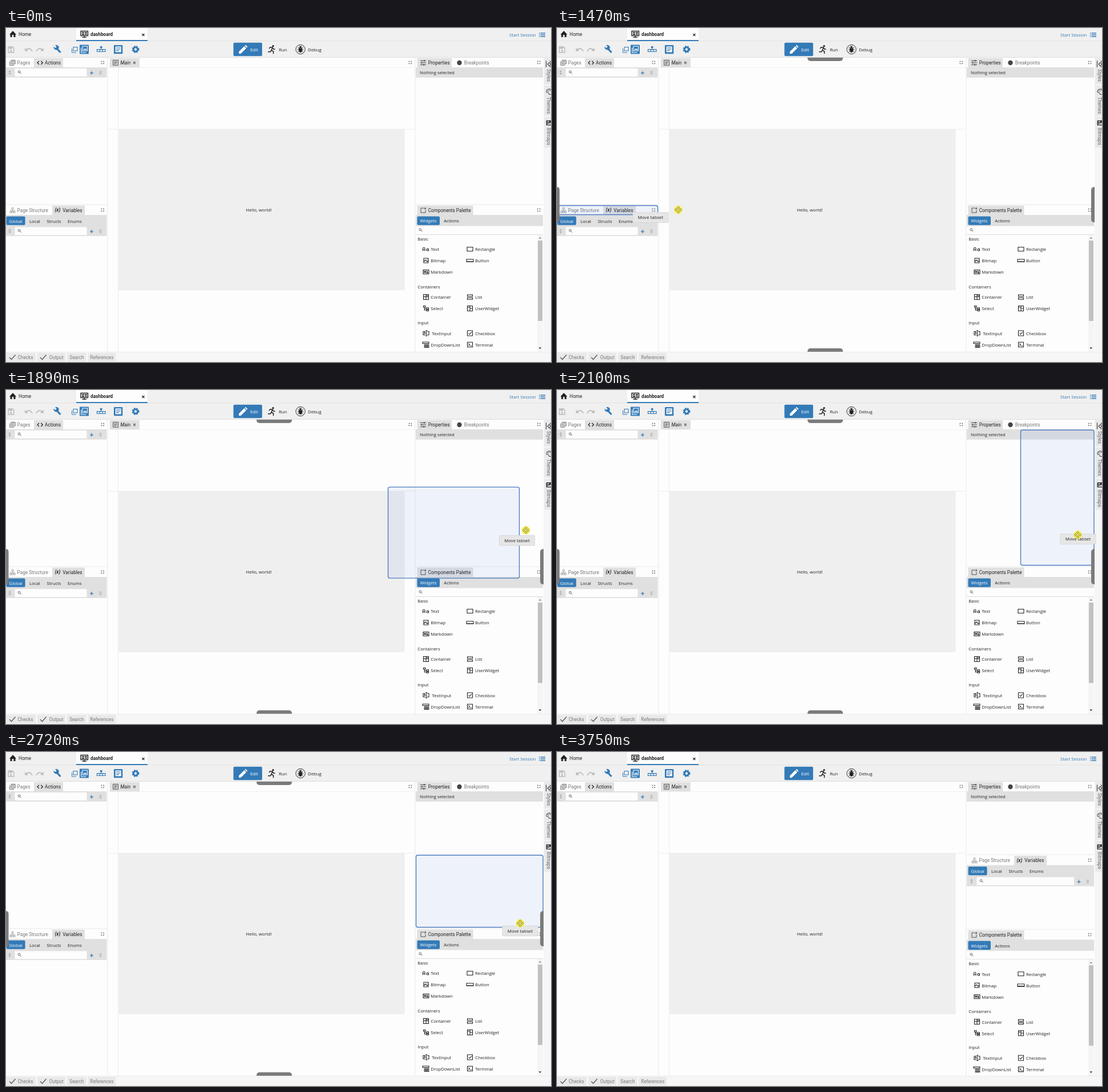
Recreate the animation shown at these times as an HTML page with a canvas. Size 955 by 586 pixels, loop 4.41 s.

```html
<!DOCTYPE html>
<html lang="en">
<head>
<meta charset="utf-8">
<title>Docking a tabset</title>
<style>
html, body { margin: 0; width: 100%; height: 100%; overflow: hidden; background: #fdfdfd; }
canvas { display: block; }
</style>
</head>
<body>
<canvas id="stage" width="955" height="586"></canvas>
<script>
const ctx = document.getElementById('stage').getContext('2d');
const LOOP = 4410, DRAG = 1340, DROP = 3130;
const BLUE = '#337ab7', INK = '#222', DIM = '#7a7a7a', BAR = '#e0e0e0', PALE = '#f0f0f0', WHITE = '#fdfdfd';
const UI = '7.75px "Open Sans", sans-serif';
const TAB = '8.25px Roboto, sans-serif';

// ---- drawing helpers ----
function box(x, y, w, h, color, r = 0) {
  ctx.fillStyle = color;
  ctx.beginPath();
  ctx.roundRect(x, y, w, h, r);
  ctx.fill();
}
function fill(d, color = INK) {
  ctx.fillStyle = color;
  ctx.fill(new Path2D(d));
}
function line(d, color = INK, width = 1) {
  ctx.strokeStyle = color;
  ctx.lineWidth = width;
  ctx.stroke(new Path2D(d));
}
function dot(x, y, r, color) {
  ctx.fillStyle = color;
  ctx.beginPath();
  ctx.arc(x, y, r, 0, 7);
  ctx.fill();
}
// y is the middle of the capitals
function text(s, x, y, color = INK, font = UI, align = 'left') {
  ctx.font = font;
  ctx.fillStyle = color;
  ctx.textAlign = align;
  ctx.fillText(s, x, y + 2.9);
}
const tab = (s, x, y, on) => text(s, x, y, on ? INK : DIM, TAB);
function at(x, y, draw) {
  ctx.save();
  ctx.translate(x, y);
  draw();
  ctx.restore();
}
const maximise = (x, y) => at(x, y, () =>
  line('M-2.2-.8V-2.2H-.8M.8-2.2H2.2V-.8M2.2.8V2.2H.8M-.8 2.2H-2.2V.8', '#444', .9));
const lens = (x, y) => at(x, y, () =>
  line('M1.2-.6A1.9 1.9 0 1 1-2.6-.6A1.9 1.9 0 1 1 1.2-.6M.6.8L2.8 3', '#444', .8));
const cross = (x, y, s, color) => at(x, y, () =>
  line(`M${-s} ${-s}L${s} ${s}M${s} ${-s}L${-s} ${s}`, color, 1.1));

// ---- top bars ----
function topBars() {
  box(0, 0, 955, 52, PALE);
  box(0, 22.5, 955, .8, '#ddd');
  box(0, 51, 955, 1, '#dcdcdc');
  fill('M6 11.5L12 5L18 11.5H16.5V16H13.4V12H10.6V16H7.5V11.5Z');
  text('Home', 22, 11.3, INK, TAB);

  box(123, 0, 125, 23, WHITE);
  box(123, 21, 125, 2, BLUE);
  line('M131 5.5H143.5V13.5H131ZM137.2 13.5V16M133.5 16.4H141', INK, 1.4);
  fill('M133 7.3H137V9H133ZM133 10H137V12H133ZM138.2 7.3H141.8V9.6H138.2ZM138.2 10.6H141.8V12H138.2Z');
  text('dashboard', 148, 11.3, INK, 'bold ' + TAB);
  cross(240.5, 12, 2, INK);
  text('Start Session', 882, 12.4, BLUE);
  line('M936.5 9H945M936.5 12H945M936.5 15H945M934 9H935.4M934 12H935.4M934 15H935.4', BLUE, 1.3);

  const off = '#b9b9b9';
  line('M4 33H11.5L13.8 35.3V43H4Z', off, 1.4);
  fill('M5.5 34H11V36.5H5.5Z', off);
  dot(8.9, 40, 1.7, off);
  for (const [x, k] of [[40, 1], [59, -1]]) at(x, 38, () => {
    ctx.scale(k, 1);
    line('M-4.5.2Q2-5 6 3', off, 1.6);
    fill('M-6.8-3.2V2.4H-1.2Z', off);
  });
  line('M88.5 35.5L95.5 43', BLUE, 3.2);
  fill('M83.5 32.5L86.3 35.2L88.8 32.8L86 30.2Q89.5 29 91.8 31.4Q94 34.5 91.3 37.2Q88 39.5 85 37.3Q82.7 35.3 83.5 32.5Z', BLUE);
  line('M118 33.5H125V40H118Z', BLUE, 1.1);
  line('M115.5 36V43H123', BLUE, 1);
  box(129, 29.5, 16, 16, BLUE, 1);
  line('M134 32H142.5V40H134Z', '#fff', 1.1);
  line('M131.7 34.5V43H140.5', '#fff', 1.1);
  fill('M135.3 38.5L137.2 36L138.6 37.4L139.8 35.8L141.6 38.5Z', '#fff');
  line('M166.7 34V38.5', BLUE, 1.1);
  line('M159.5 37.7H174V41.5H159.5ZM164.3 37.7V41.5M169.2 37.7V41.5', BLUE, 1.2);
  fill('M164.9 32H168.5V35.2H164.9Z', BLUE);
  box(189, 30, 15.3, 15.3, BLUE, 1);
  box(191.7, 32.4, 10, 10, '#fff');
  line('M193 34.8H200.4M193 37.2H200.4M193 39.6H198', BLUE, 1.1);
  line('M230.7 37.5A3.7 3.7 0 1 1 223.3 37.5A3.7 3.7 0 1 1 230.7 37.5', BLUE, 3);
  ctx.setLineDash([2.4, 2.15]);
  line('M232.6 37.5A5.6 5.6 0 1 1 221.4 37.5A5.6 5.6 0 1 1 232.6 37.5', BLUE, 1.8);
  ctx.setLineDash([]);

  box(398.5, 25.7, 50.3, 23.6, BLUE, 2);
  fill('M408 45V41.6L417.5 32L421 35.4L411.4 45ZM418.4 31.2L419.9 29.8L423.3 33.2L421.9 34.6Z', '#fff');
  text('Edit', 428, 38, '#fff');
  dot(468, 31.6, 1.7, INK);
  line('M461 36L463 33.8L467 34.2L465 39L468.5 41V45.3M465 39L463.5 41.7H459M467 34.5L469 37.2H471.5', INK, 1.5);
  text('Run', 478, 38);
  line('M524.2 37.5A8.2 8.2 0 1 1 507.8 37.5A8.2 8.2 0 1 1 524.2 37.5', INK, .9);
  line('M511.5 33.5L513.5 36H518.5L520.5 33.5M510.7 38H521.3M511.5 42.5L513.5 40H518.5L520.5 42.5M514.5 31L515.4 33M517.5 31L516.6 33', INK, .9);
  fill('M516 32.3Q518.2 32.5 518.2 35H513.8Q513.8 32.5 516 32.3ZM513 35.5H519V39Q518.5 43 516 43Q513.5 43 513 39Z');
  text('Debug', 529, 38);
}

// ---- panels ----
function searchRow(left, right, y) {
  at(left + 6.5, y, () => fill('M-2.2-.8L0-4L2.2-.8ZM-2.2.8L0 4L2.2.8Z', '#aaa'));
  box(left + 15.5, y - 7, right - left - 50.5, 14, WHITE);
  lens(left + 23.8, y - .5);
  at(right - 26.5, y + .8, () => line('M-3 0H3M0-3V3', BLUE, 1.3));
  at(right - 11, y + .5, () => {
    line('M-2.5-2.3H2.5M-.8-3.2H.8', '#bbb', 1);
    fill('M-2-1.3H2L1.7 3.3H-1.7Z', '#c3c3c3');
  });
}

function variables(left, right, y) {
  at(left + 11.5, y + 8.7, () =>
    line('M-1.5-4.5H1.5V-1.8H-1.5ZM0-1.8V.5M-3.5 2V.5H3.5V2M-4.7 2H-2.2V4.5H-4.7ZM-1.2 2H1.2V4.5H-1.2ZM2.2 2H4.7V4.5H2.2Z', '#999', .8));
  tab('Page Structure', left + 19.5, y + 8.7);
  box(left + 81, y + .5, 57, 17, BAR);
  text('(x)', left + 85.5, y + 8.2, INK, 'italic bold ' + TAB);
  tab('Variables', left + 99.3, y + 8.7, true);
  maximise(right - 7.3, y + 8.3);
  box(left - 2, y + 17, right - left + 2, 37, BAR);
  box(left + .6, y + 19.4, 33, 15.4, BLUE, 2);
  text('Global', left + 5.5, y + 27.7, '#fff');
  text('Local', left + 41, y + 27.7);
  text('Structs', left + 71.5, y + 27.7);
  text('Enums', left + 108, y + 27.7);
  searchRow(left, right, y + 45.3);
}

function leftTop() {
  line('M9 56.5H16V63H9ZM6.7 58.5V65.3H14M10.5 58.5H14.5M10.5 60.7H14.5', '#555', .9);
  tab('Pages', 19.5, 61);
  box(49, 53, 51, 16, BAR);
  line('M58 58L55 61L58 64M61.3 58L64.3 61L61.3 64', INK, 1.2);
  tab('Actions', 68, 61, true);
  maximise(169.3, 60.5);
  box(0, 69, 176.5, 18, BAR);
  searchRow(0, 176.5, 78);
}

function editor() {
  box(182, 53, 52, 16, BAR);
  line('M187.7 56.5H196.5V65.3H187.7ZM189.5 59H194.7M189.5 61H194.7M189.5 63H193', '#444', .9);
  text('Main', 200.5, 61, INK, 'italic ' + TAB);
  cross(225, 61, 2, '#666');
  maximise(708.3, 60.5);
  box(179, 69, 537, .8, '#eee');
  box(196, 69, 1, 499, '#eee');
  box(179, 177, 537, 1, '#eee');
  box(196.5, 178, 502, 282, '#efefef');
  text('Hello, world!', 442.8, 319, INK, UI, 'center');
}

function properties() {
  box(720.5, 53, 60.5, 16, BAR);
  line('M726 57.5H736M726 61H736M726 64.5H736M733 56V59M728.5 59.5V62.5M732 63V66', '#333', .9);
  tab('Properties', 739.7, 61, true);
  dot(794.5, 61, 4.2, '#444');
  tab('Breakpoints', 802.8, 61);
  maximise(933.7, 60.5);
  box(718, 69, 223, 18, BAR);
  text('Nothing selected', 725, 78.3);
}

const widgets = [
  ['Text', 744.3, 388, 'M-5.5 3.2V-1Q-5.5-3-3.7-3Q-2-3-2-1V3.2M-5.5 1H-2M4.5-.8V3.2M4.5 1.2A1.8 1.8 0 1 1 .9 1.2A1.8 1.8 0 1 1 4.5 1.2'],
  ['Rectangle', 822, 388, 'M-5-3.5H5V3.5H-5Z'],
  ['Bitmap', 744.3, 408, 'M-4-4H4V4H-4ZM-4 2L-1-1L2 2L4 0M1.2-2H2.2'],
  ['Button', 822, 408, 'M-6-2.2H6V2.2H-6ZM-6 1.7H6'],
  ['Markdown', 744.3, 428, 'M-5-3.5H5V3.5H-5ZM-3 2V-1.5L-1.5.5L0-1.5V2M2.5-2V1.5M1.3.5L2.5 2L3.7.5'],
  ['Container', 744.3, 472, 'M-4.5-4.5H4.5V4.5H-4.5ZM0-4.5V4.5M-4.5-.5H4.5M0-2.5H4.5'],
  ['List', 822, 472, 'M-4.5-4H4.5V-1H-4.5ZM-4.5 1.2H4.5V4.2H-4.5Z'],
  ['Select', 744.3, 492, 'M-4.5-4.5H-1V-2H-4.5ZM-2.7-2V3H1M-2.7.2H1M1-1.2H4.5V1.2H1ZM1 2.2H4.5V4.5H1Z'],
  ['UserWidget', 822, 492, 'M-4.5-4.5H4.5V4.5H-4.5ZM0-4.5V4.5M0 0H4.5M-4.5-2H0'],
  ['TextInput', 746.3, 535.5, 'M-1-3H-5V3H-1M2.5-3H5V3H2.5M.8-4.5V4.5M-.7-4.7H2.3M-.7 4.7H2.3M-3.5 1L-2.2-1.5L-1 1'],
  ['Checkbox', 822, 535.5, 'M-4.5-4.5H4.5V4.5H-4.5ZM-2.5 0L-.7 2L3-2.2'],
  ['DropDownList', 744.3, 555.5, 'M-6-4.5H5V-2H-6ZM-3.5-.2H5.5M-3.5 1.6H5.5M-3.5 3.4H5.5M-3.5 5H5.5'],
  ['Terminal', 822, 555.5, 'M-4.5-4.2H4.5V4.2H-4.5ZM-2.5-2L-.5 0L-2.5 2M.5 2H3']
];

function palette() {
  box(720.5, 311.5, 98, 17, BAR);
  line('M732 316H727V324H735V319.5M734.5 314.5V318.5M732.5 316.5H736.5', '#444', .9);
  tab('Components Palette', 739.7, 319.7, true);
  maximise(933.7, 319.3);
  box(718, 328, 223, 19.5, BAR);
  box(720.5, 330.4, 39.5, 15.4, BLUE, 2);
  text('Widgets', 725.5, 338.5, '#fff');
  text('Actions', 767.3, 338.5);
  lens(726.5, 354.3);
  box(718, 362, 223, .9, '#ddd');
  text('Basic', 721.3, 370.3);
  text('Containers', 721.3, 453.7);
  text('Input', 721.3, 517);
  for (const [name, x, y, d] of widgets) {
    text(name, x, y + .4);
    at(x < 800 ? 736 : 813, y, () => line(d, INK, 1.1));
  }
  box(931, 363, 10, 205, '#f5f5f5');
  box(932, 373, 8, 141, '#c1c1c1');
  fill('M933.4 369.5L935.8 366.8L938.2 369.5Z', '#888');
}

function sidebars() {
  box(942, 52, 13, 516, '#f6f6f6');
  for (const [name, y, h, start] of [['Styles', 53, 46, 72], ['Themes', 101, 53, 121], ['Bitmaps', 156, 54, 175]]) {
    box(943, y, 12, h, '#e9e9e9');
    at(951, start, () => {
      ctx.rotate(Math.PI / 2);
      text(name, 0, 0, '#666', TAB);
    });
  }
  line('M946.5 57.5V69M949 63.5L952 60.5L955 63.5L952 66.5ZM953 58L955 60M952 68H955', '#444', 1.2);
  line('M955 108Q950 105.5 947 110.5Q946.5 113.5 950 113.5Q952 114 951.5 116.5H955', '#555', 1.1);
  dot(950, 110.5, .9, '#555');
  dot(953, 109.6, .9, '#555');
  box(946.5, 162, 9, 9, '#444', 1);
  fill('M948 169.5L950 167L951.5 168.3L953.5 166L955 168V169.5ZM949 163.5H951V165.5H949Z', '#eee');

  box(0, 568, 955, 18, '#f6f6f6');
  box(0, 568, 955, .8, '#e8e8e8');
  for (const [name, x, w, tx] of [['Checks', 1, 51, 20.5], ['Output', 55, 49, 75.8], ['Search', 107, 33.5, 111.3], ['References', 143.5, 49, 147.3]]) {
    box(x, 570, w, 15, '#e9e9e9');
    tab(name, tx, 577.7);
    if (tx - x > 10) at(x, 577.5, () => line('M5 .5L8.5 4L15.5-4', '#555', 1.3));
  }
}

function layout(docked) {
  box(0, 0, 955, 586, WHITE);
  topBars();
  box(177, 52, 1.5, 516, PALE);
  box(716, 52, 1.5, 516, PALE);
  leftTop();
  editor();
  properties();
  if (docked) {
    box(718, 179.5, 223, 1.5, PALE);
    variables(720, 941, 181.5);
  } else {
    box(0, 309, 177, 1.5, PALE);
    variables(0, 176.5, 311);
  }
  at(0, docked ? 1.2 : 0, () => {
    box(718, 309, 223, 1.5, PALE);
    palette();
  });
  fill('M933.4 560.5L935.8 563.2L938.2 560.5Z', '#333');
  sidebars();
}

// ---- motion ----
// Screen updates: [first, last, count], about 70 ms apart
const updates = [0];
for (const [a, b, n] of [[460, 940, 8], [1010, 1140, 3], [1340, 1820, 8], [1890, 2380, 8], [2450, 2720, 5], [3130, 3130, 1], [3400, 3750, 6]])
  for (let i = 0; i < n; i++) updates.push(Math.floor((a + (b - a) * i / (n - 1 || 1)) / 10) * 10);

const route = [
  [460, 822, 550], [530, 710, 505], [600, 530, 432], [670, 350, 375], [740, 222, 346], [800, 155, 336], [870, 130, 334],
  [940, 132, 330], [1010, 138, 327], [1140, 149, 321], [1340, 151, 320], [1400, 164, 319], [1470, 212.5, 319],
  [1540, 345, 309], [1610, 560, 286], [1680, 745, 266], [1750, 850, 256], [1820, 895.5, 250.5], [1890, 911, 246],
  [2030, 913, 248], [2170, 912, 260], [2310, 910, 273], [2380, 907.5, 278.5], [2520, 904, 292], [2650, 901, 300.5],
  [3330, 901, 300.5], [3400, 903, 316], [3470, 908, 362], [3540, 917, 430], [3610, 926, 500], [3680, 933, 562], [3750, 935, 600]
];
const mix = (a, b, k) => a + (b - a) * k;
function pointer(t) {
  const i = Math.max(1, route.findIndex(p => p[0] >= t));
  const [t0, x0, y0] = route[i - 1], [t1, x1, y1] = route[i];
  const k = (t - t0) / (t1 - t0);
  return [mix(x0, x1, k), mix(y0, y1, k)];
}

// The CSS "ease" curve
function ease(x) {
  if (x >= 1) return 1;
  const curve = (u, a, b) => 3 * (1 - u) * u * ((1 - u) * a + u * b) + u ** 3;
  let lo = 0, hi = 1;
  for (let i = 0; i < 16; i++) {
    const mid = (lo + hi) / 2;
    if (curve(mid, .25, .25) < x) lo = mid; else hi = mid;
  }
  return curve(lo, .1, 1);
}

// Drop zones as left, top, right, bottom
const header = [0, 311.5, 176.5, 327.5];
const zones = [
  [1470, [179, 53, 448, 568]],
  [1650, [179, 53, 717, 568]],
  [1698, [718.5, 181, 941, 307.5]],
  [1930, [830.5, 53, 941, 307.5]],
  [2390, [718.5, 181, 941, 307.5]]
];
// As in CSS, each edge moves on its own and restarts only when its goal changes
function outline(t) {
  return header.map((first, edge) => {
    const goals = zones.map(([start, zone]) => [start, zone[edge]])
      .filter(([, goal], i, all) => goal !== all[i - 1]?.[1]);
    return goals.reduce((v, [start, goal], i) => {
      const end = Math.min(t, goals[i + 1]?.[0] ?? t);
      return end > start ? mix(v, goal, ease((end - start) / 300)) : v;
    }, first);
  });
}

function dragLayer(t, before) {
  const [l, top, r, b] = outline(t);
  box(l, top, r - l, b - top, 'rgba(66,113,214,.08)', 3);
  ctx.strokeStyle = '#4f7dc0';
  ctx.lineWidth = 1.4;
  ctx.stroke();
  const grip = '#7b7b7b';
  box(439, 52, 62, 6, grip, [0, 0, 5, 5]);
  box(439, 562, 62, 6, grip, [5, 5, 0, 0]);
  box(0, 279, 4.5, 62, grip, [0, 5, 5, 0]);
  box(936, 279, 6, 62, grip, [5, 0, 0, 5]);

  const [x, y] = pointer(before);
  box(x - 31.5, y + 4.2, 63, 18.5, '#d2d2d2', 2);
  box(x - 30.8, y + 4.9, 61.6, 17.1, '#e6e6e6', 2);
  text('Move tabset', x, y + 13.2, INK, UI, 'center');
}

function cursor(t) {
  const [x, y] = pointer(t);
  at(x, y, () => {
    if (t >= DRAG && t < DROP) {
      dot(0, 0, 7.3, 'rgba(255,246,40,.8)');
      const d = 'M0-6.5L2.5-4H1V-1H4V-2.5L6.5 0L4 2.5V1H1V4H2.5L0 6.5L-2.5 4H-1V1H-4V2.5L-6.5 0L-4-2.5V-1H-1V-4H-2.5Z';
      fill(d, '#fff681');
      line(d, '#7d7530', .8);
    } else {
      const d = t >= 870 && t < 1010
        ? 'M-1.2 1C-1.2-.3 1.2-.3 1.2 1V5L5.5 6.2Q7 6.6 6.8 8L6 13.5H0L-3.6 9Q-3.4 7.2-1.2 8.8Z'
        : 'M0 0V11L2.5 8.8L4.2 12.5L6 11.7L4.4 8.2H7.8Z';
      fill(d, '#fff');
      line(d, '#111', .9);
    }
  });
}

function frame(now) {
  const time = now % LOOP;
  const i = updates.findLastIndex(u => u <= time);
  const t = updates[i];
  layout(t >= DROP);
  if (t >= DRAG && t < DROP) dragLayer(t, updates[i - 1]);
  if (t >= 460 && t < 3750) cursor(t);
}

const start = performance.now();
function tick() {
  frame(Math.max(0, performance.now() - start));
  requestAnimationFrame(tick);
}
tick();
</script>
</body>
</html>
```
